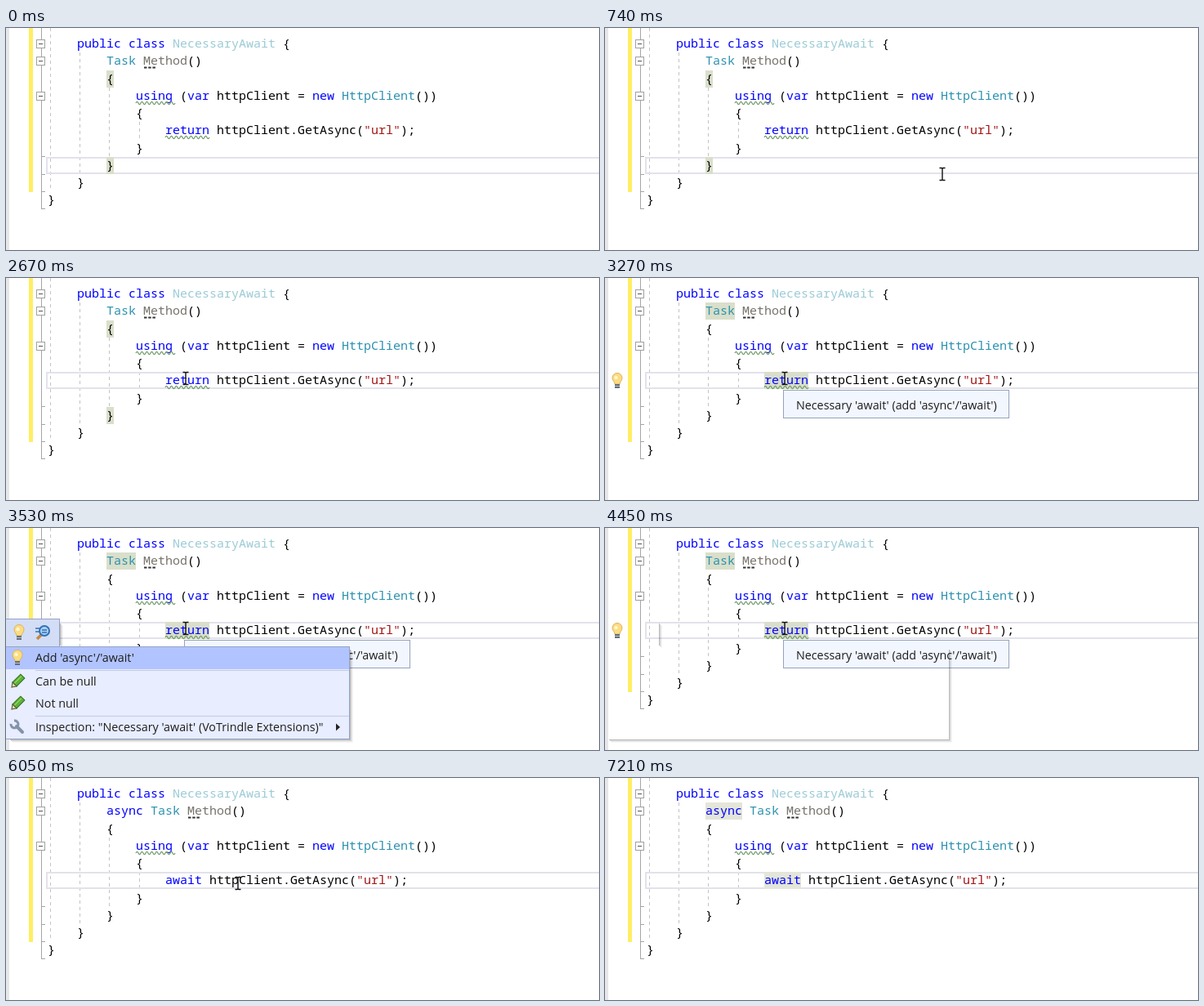
These frames come from a looping animation (726 by 272 pixels, 7470 ms). An HTML page:

```html
<!DOCTYPE html>
<html lang="en">
<head>
<meta charset="utf-8">
<title>Code fix</title>
<style>
html, body { margin: 0; width: 100%; height: 100%; overflow: hidden; background: #fff; }
svg { display: block; }
text { white-space: pre; }
.code { font: 15px "Noto Sans Mono", "Liberation Mono", monospace; }
.ui { font: 14.3px "Open Sans", "Noto Sans", sans-serif; fill: #1e1e1e; }
</style>
</head>
<body>
<svg id="stage" width="726" height="272" viewBox="0 0 726 272"></svg>
<script>
const LOOP = 7470, STEP = 70;
const KEY = '#0000ff', TYPE = '#2b91af', FADED = '#9ccbd6', DIM = '#77736c',
      STR = '#a31515', INK = '#000', MARK = '#d9dfca', SOFT = '#e3e6d8';

const colX = c => 51 + 9 * c;
const rowY = r => Math.round(9 + 21.25 * r);

const rect = (x, y, w, h, fill, extra = '') =>
  `<rect x="${x}" y="${y}" width="${w}" height="${h}" fill="${fill}" ${extra}/>`;
const path = (d, stroke, width = 1, extra = '') =>
  `<path d="${d}" fill="none" stroke="${stroke}" stroke-width="${width}" ${extra}/>`;
const group = (id, body) => `<g id="${id}">${body}</g>`;
const label = (x, y, s) => `<text class="ui" x="${x}" y="${y}">${s}</text>`;

// One line of code: pairs of text and colour
function code(row, c, ...parts) {
  let out = '';
  for (let i = 0; i < parts.length; i += 2) {
    out += `<text class="code" x="${colX(c)}" y="${rowY(row) + 15}" fill="${parts[i + 1]}">${parts[i]}</text>`;
    c += parts[i].length;
  }
  return out;
}
const mark = (row, c, n, fill) => rect(colX(c), rowY(row), 9 * n, 21, fill);

function wave(row, c, n) {
  let d = `M${colX(c)} ${rowY(row) + 19}`;
  for (let x = 0; x < 9 * n; x += 6) d += 'q1.5 -3.4 3 0t3 0';
  return path(d, '#6f9a68', 1.2);
}
const dots = c => path(`M${colX(c) + 1} ${rowY(1) + 18.5}h14`, '#333', 2, 'stroke-dasharray="3.5 1.7"');
const guide = (x, a, b) => path(`M${x} ${a}V${b}`, '#c3c3c3', 1, 'stroke-dasharray="4 4"');

function margin() {
  let s = rect(0, 0, 4, 272, '#e6e7e8') + rect(28, 0, 5, 201, '#ffee62');
  s += path('M43.5 0V221.5', '#a5a5a5');
  for (const y of [157, 179, 200, 221]) s += path(`M43 ${y + .5}h5`, '#a5a5a5');
  for (const y of [20, 41, 84])
    s += rect(37.5, y - 5.5, 10, 10, '#fff', 'stroke="#a0a0a0"') + path(`M40 ${y - .5}h5`, '#555');
  return s + guide(54.5, 0, 200) + guide(90.5, 30, 179) + guide(126.5, 73, 158) + guide(163.5, 115, 137);
}

const bulb = (x, y) => `<g transform="translate(${x} ${y})">
  <path d="M-3 4C-3 1-6 0-6-3.5A6 6 0 0 1 6-3.5C6 0 3 1 3 4Z" fill="#fcdc80" stroke="#d9b45c"/>
  <circle cx="-1.5" cy="-4" r="2.2" fill="#fff5cf"/>
  ${rect(-3, 4, 6, 5, '#66707c')}${path('M-3 6.5h6', '#b9c0c8')}</g>`;

const pencil = (x, y) => `<g transform="translate(${x} ${y}) rotate(-45)">
  ${rect(-5, -3.5, 14, 7, '#5fb336', 'stroke="#2f6d1c"')}
  <path d="M-5-3.5L-10 0L-5 3.5Z" fill="#f0d9a0" stroke="#4c5a30"/>${path('M-4-1H8', '#a4dc7c')}</g>`;

const lens = (x, y) => path(`M${x - 2} ${y + 3}l-5 5`, '#c48a3c', 3.5) +
  `<circle cx="${x + 2}" cy="${y - 2}" r="6" fill="#a9d2f5" stroke="#3470b4" stroke-width="2"/>` +
  path(`M${x - 9} ${y - 5}h6m-6 4h5M${x - 1} ${y - 3}h6m-6 3h6`, '#3470b4', 1.4);

const wrench = (x, y) => path(`M${x - 1} ${y - 1}l7 7`, '#8393a8', 4, 'stroke-linecap="round"') +
  path(`M${x - 4} ${y - 8}a4.5 4.5 0 1 1 -4 4`, '#8393a8', 3);

function shade() {
  return [.26, .16, .09, .04].map((o, i) =>
    path('M66.5 117V144M421.5 149V259.5H5', '#000', 1, `opacity="${o}" transform="translate(${i} ${i})"`)).join('');
}

function menu() {
  const edge = 'stroke="#94a3c6"';
  return rect(-.5, 111.5, 66, 34, '#d3ddf6', edge) + bulb(16, 128) + lens(45, 128) +
    rect(-.5, 145.5, 421, 113, '#e8edff', edge) + rect(0, 146, 420, 27, '#b1c4ff') +
    path('M36 174.5H420M36 230.5H420', '#c3cbe0') +
    bulb(14, 159) + pencil(14, 188) + pencil(14, 215) + wrench(14, 244) +
    label(36, 164, "Add 'async'/'await'") + label(36, 193, 'Can be null') + label(36, 220, 'Not null') +
    label(36, 249, `Inspection: "Necessary 'await' (VoTrindle Extensions)"`) +
    '<path d="M404 239.5l5 4.5l-5 4.5z" fill="#222"/>';
}

const call = ['httpClient.GetAsync(', INK, '"url"', STR, ');', INK];

document.getElementById('stage').innerHTML =
  margin() +
  group('line', rect(50, 1, 700, 19, 'none', 'stroke="#e2e2ec" stroke-width="2"')) +
  group('braces', mark(2, 8, 1, MARK) + mark(7, 8, 1, MARK)) +
  group('exits', mark(1, 8, 4, MARK) + mark(5, 16, 6, MARK)) +
  group('awaits', mark(1, 8, 5, SOFT) + mark(5, 16, 5, SOFT)) +
  code(0, 4, 'public class ', KEY, 'NecessaryAwait', FADED, ' {', INK) +
  code(2, 8, '{', INK) +
  code(3, 12, 'using', KEY, ' (', INK, 'var', KEY, ' httpClient = ', INK, 'new ', KEY, 'HttpClient', TYPE, '())', INK) +
  wave(3, 12, 5) +
  code(4, 12, '{', INK) + code(6, 12, '}', INK) + code(7, 8, '}', INK) +
  code(8, 4, '}', INK) + code(9, 0, '}', INK) +
  group('before', code(1, 8, 'Task ', TYPE, 'Method', DIM, '()', INK) + dots(13) +
    code(5, 16, 'return ', KEY, ...call) + wave(5, 16, 6)) +
  group('after', code(1, 8, 'async ', KEY, 'Task ', TYPE, 'Method', DIM, '()', INK) + dots(19) +
    code(5, 16, 'await ', KEY, ...call)) +
  group('caret', rect(239, 115, 2, 21, '#000')) +
  group('bulb', bulb(15, 126)) +
  group('pointer', path('M-3.5-7.5h2.5q1 0 1 1q0-1 1-1h2.5M0-7V7M-3.5 7.5h2.5q1 0 1-1q0 1 1 1h2.5', '#111', 1.4)) +
  group('tip', rect(218.5, 137.5, 276, 34, '#f2f6ff', 'stroke="#94a3c0"') +
    label(234, 161, "Necessary 'await' (add 'async'/'await')")) +
  group('shade', shade()) +
  group('menu', menu());

// Spans of visibility: start, end, start, end ...
const shown = {
  braces: [0, 3130],
  exits: [2870, 4590],
  awaits: [7210, LOOP],
  before: [0, 4590],
  after: [4590, LOOP],
  caret: [5120, 5650, 6190, 6680, 7010, 7210],
  bulb: [3130, 4660],
  pointer: [200, 6750],
  tip: [1350, 2670, 3270, 4520],
  shade: [3530, 4520],
  menu: [3530, 4450]
};

const route = [
  [200, 664, 246], [410, 599, 232], [600, 599, 232], [1090, 220, 123], [4520, 220, 123],
  [4860, 130, 62], [5980, 130, 62], [6050, 284, 129], [6680, 637, 229], [LOOP, 637, 229]
];

// The pointer is sampled every STEP ms and slows down towards each stop
function pointerAt(t) {
  const i = Math.max(0, route.findIndex(k => k[0] > t) - 1);
  const [t0, x0, y0] = route[i], [t1, x1, y1] = route[i + 1];
  const p = Math.max(0, Math.floor((t - t0) / STEP) * STEP / (t1 - t0));
  const e = p * (2 - p);
  return [x0 + (x1 - x0) * e, y0 + (y1 - y0) * e];
}

const el = id => document.getElementById(id);

function draw(now) {
  const t = now % LOOP;
  for (const id in shown) {
    const on = shown[id].some((a, i, s) => i % 2 === 0 && t >= a && t < s[i + 1]);
    el(id).style.display = on ? '' : 'none';
  }
  el('line').setAttribute('transform', `translate(0 ${rowY(t < 2670 ? 7 : 5)})`);
  const [x, y] = pointerAt(t);
  el('pointer').setAttribute('transform', `translate(${Math.round(x)} ${Math.round(y)})`);
  requestAnimationFrame(draw);
}
draw(performance.now());
</script>
</body>
</html>
```
